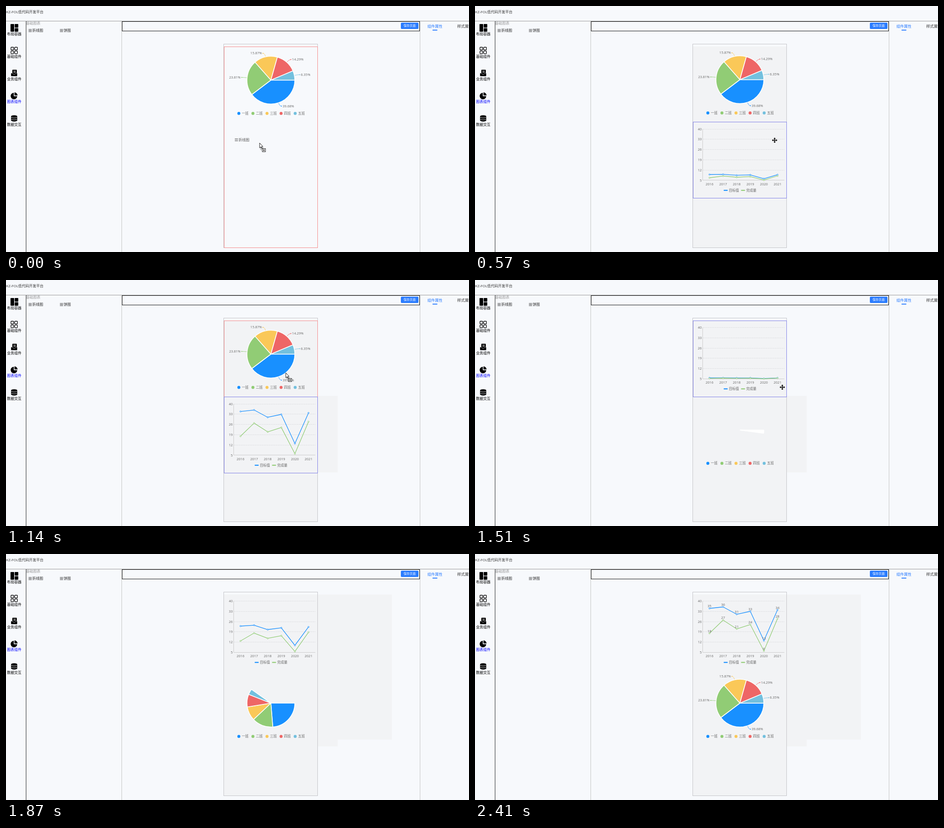
Recreate the animation shown at these times as an HTML page. Size 1026 by 546 pixels, loop 2.51 s.

```html
<!DOCTYPE html>
<html lang="zh-CN">
<head>
<meta charset="utf-8">
<title>低代码开发平台</title>
<style>
html, body { margin: 0; width: 100%; height: 100%; overflow: hidden; background: #f7f9fc; }
svg { display: block; width: 1026px; height: 546px; font: 7.5px "Open Sans", "Noto Sans CJK SC", "Noto Sans CJK", sans-serif; }
</style>
</head>
<body>
<svg viewBox="0 0 1026 546"><g id="chrome"></g><g id="stage"></g></svg>
<script>
const LOOP = 2510, GREY = '#f2f3f5', INK = '#666';
const COLORS = ['#1890ff', '#91cc75', '#fac858', '#ee6666', '#73c0de'];
const CLASSES = ['一班', '二班', '三班', '四班', '五班'];
const COUNTS = [25, 15, 10, 9, 4], TOTAL = 63;
const SERIES = [[35, 36, 31, 33, 13, 34], [18, 27, 21, 24, 6, 28]];

// time, pointer kind, pointer position
const STEPS = [
  [0, 'copy', 562, 304], [140, 'copy', 590, 303], [270, 'move', 617, 302],
  [420, 'move', 621, 300], [570, 'move', 664, 298], [720, 'arrow', 716, 311],
  [840, 'arrow', 729, 338], [990, 'move', 660, 325], [1140, 'copy', 620, 206],
  [1260, 'copy', 622, 200], [1390, 'move', 650, 220], [1510, 'move', 681, 238],
  [1630, 'arrow', 846, 330], [1750], [1870], [2020], [2140], [2260], [2410]
];
const DROP = 270, LIFT = 1140, SWAP = 1390;

const text = (x, y, s, size = 7.5, fill = INK, anchor = 'start', more = '') =>
  `<text x="${x}" y="${y + size * .36}" font-size="${size}" fill="${fill}" text-anchor="${anchor}" ${more}>${s}</text>`;
const rect = (x, y, w, h, fill, more = '') =>
  `<rect x="${x}" y="${y}" width="${w}" height="${h}" fill="${fill}" ${more}/>`;
const frame = (x, y, w, h, stroke) => rect(x, y, w, h, 'none', `stroke="${stroke}"`);
const path = (d, stroke, width = 1, fill = 'none', more = '') =>
  `<path d="${d}" stroke="${stroke}" stroke-width="${width}" fill="${fill}" ${more}/>`;
const dot = (x, y, r, fill, more = '') => `<circle cx="${x}" cy="${y}" r="${r}" fill="${fill}" ${more}/>`;
const menuItem = (x, y, s, fill) =>
  path(`M${x} ${y - 2.5}h7m-7 2.5h7m-7 2.5h7`, fill, .9) + text(x + 8.3, y, s, 8, fill);

const ease = p => p <= 0 ? 0 : p >= 1 ? 1 : p < .5 ? 4 * p ** 3 : 1 - 4 * (1 - p) ** 3;

function chrome() {
  const icons =
    rect(10, 40, 8, 17, '#000', 'rx="1"') + rect(19.2, 40, 8, 8, '#000', 'rx="1"') + rect(19.2, 49.2, 8, 7.8, '#000', 'rx="1"') +
    [[11, 91.5], [19.3, 91.5], [11, 99.8], [19.3, 99.8]].map(([x, y]) =>
      rect(x, y, 6, 6, 'none', 'rx="1" stroke="#000" stroke-width="1.3"')).join('') +
    rect(14, 141.5, 10, 11, '#000', 'rx="1"') + path('M16.5 144.7h5m-5 2.5h5', '#fff') +
    path('M11 149h3.5l1.5 2.5h4l1.5-2.5H25v5.5q0 1.5-1.5 1.5h-11q-1.5 0-1.5-1.5z', '#f7f9fc', .5, '#000') +
    path('M17.3 192.5v7.7h7.6a7.3 7.3 0 1 1-7.6-7.7z', 'none', 0, '#000') +
    path('M18.8 191.8a7 7 0 0 1 6.8 6.8h-6.8z', 'none', 0, '#000') +
    path('M11.2 245v8.5c0 4 13.8 4 13.8 0v-8.5c0-3.4-13.8-3.4-13.8 0z', 'none', 0, '#000') +
    path('M11 246.3c1 3 13 3 14 0m-14 4.2c1 3 13 3 14 0', '#f7f9fc', .9);
  const labels = ['布局容器', '基础组件', '业务组件', '图表组件', '数据交互'].map((s, i) =>
    text(2.2, 62 + 50.2 * i, s, 8, i == 3 ? '#00f' : '#000', 'start', i == 3 ? 'font-weight="500"' : '')).join('');
  return text(.5, 13.5, 'KZ-FOL低代码开发平台', 8, '#333', 'start', 'font-weight="500"') +
    path('M0 33.5H1026', '#999') + path('M256.5 34V546M917.5 34V546', '#c4c4c4') + path('M44.5 34V546', '#222') +
    frame(257.5, 34.5, 659, 21, '#111') +
    rect(875, 37, 39, 14, '#2a7cff', 'rx="2"') + text(894.5, 44, '保存页面', 6.8, '#fff', 'middle') +
    text(44.3, 38.5, '基础图表', 8, '#999') + menuItem(50, 54.5, '折线图', '#222') + menuItem(119.5, 54.5, '饼图', '#222') +
    text(933.7, 45, '组件属性', 8.4, '#2a7cff') + rect(945, 52.5, 11, 2, '#2a7cff', 'rx="1"') +
    text(1000, 45, '样式属性', 8.4, '#333') + icons + labels;
}

function pie(top, p) {
  const cx = 587, cy = top + 73.5, r = 53, e = ease(p);
  const at = (a, d) => [cx + d * Math.cos(a), cy + d * Math.sin(a)];
  let a = 0, slices = '', labels = '', legend = '';
  COUNTS.forEach((n, i) => {
    const sweep = 2 * Math.PI * n / TOTAL * e, mid = a + sweep / 2, color = COLORS[i];
    if (e > .005)
      slices += path(`M${cx} ${cy}L${at(a, r)}A${r} ${r} 0 0 1 ${at(a + sweep, r)}z`, '#fff', 1.6,
        e < .03 ? '#fff' : color, 'stroke-linejoin="bevel"');
    if (p >= 1) {
      const [x, y] = at(mid, 61), side = x > cx ? 1 : -1;
      labels += path(`M${at(mid, r)}Q${x} ${y} ${x + 4 * side} ${y}`, color, .8) + dot(x + 4 * side, y, 1, color) +
        text(x + 6.5 * side, y - .4, (100 * n / TOTAL).toFixed(2) + '%', 7.5, INK, side > 0 ? 'start' : 'end');
    }
    legend += dot(516 + 31.2 * i, top + 147.4, 3.3, color) + text(522.5 + 31.2 * i, top + 147.2, CLASSES[i]);
    a += sweep;
  });
  return labels + slices + legend;
}

function lines(top, p) {
  const left = 504.5, right = 685.5, low = top + 128.3, high = 113.8, e = ease(p);
  const px = i => left + 15.1 + 30.15 * i, py = v => low - (v - 5) / 35 * high * e;
  let out = '';
  for (let i = 0; i < 6; i++) {
    const y = low - high * i / 5, snap = Math.floor(y) + .5;
    out += path(`M${left} ${snap}H${right}`, i ? '#dcdde0' : '#ccc', 1, 'none', i ? 'stroke-dasharray="2.6 1.3"' : '') +
      text(502.3, y, 5 + 7 * i, 7.5, INK, 'end') + text(px(i), top + 136.4, 2016 + i, 7.5, INK, 'middle');
  }
  out += path(`M${left} ${low - high}V${low}`, '#ccc');
  SERIES.forEach((data, s) => {
    const color = COLORS[s];
    out += path('M' + data.map((v, i) => [px(i), py(v)]).join('L'), color, 1.3, 'none', 'stroke-linejoin="bevel"') +
      data.map((v, i) => dot(px(i), py(v), 1.4, '#fff', `stroke="${color}" stroke-width="1"`)).join('');
    if (p >= 1) out += data.map((v, i) => text(px(i), py(v) - 5, v, 7.5, INK, 'middle')).join('');
    out += rect(551 + 38.5 * s, top + 149.6, 9, 2.2, color, 'rx="1"') +
      text(562.4 + 38.5 * s, top + 150.6, ['目标值', '完成量'][s]);
  });
  return out;
}

function pointer(kind, x, y) {
  if (!kind) return '';
  const arrow = 'M0 0v11l2.5-2.3 1.7 3.6 1.6-.7-1.7-3.6h3.3z';
  let shape = '';
  if (kind == 'move') {
    const quarter = 'M0-6l2.5 2.8h-1.7v2.4h2.4v-1.7L6 0 3.2 2.5v-1.7h-2.4v2.4h1.7L0 6';
    const d = quarter + 'l-2.5-2.8h1.7v-2.4h-2.4v1.7L-6 0l2.8-2.5v1.7h2.4v-2.4h-1.7z';
    shape = path(d, '#fff', 1, '#000', 'paint-order="stroke"');
  } else if (kind == 'arrow') {
    shape = path(arrow, '#fff', .8, '#000', 'paint-order="stroke"');
  } else {
    shape = path(arrow, '#000', .9, '#fff') +
      rect(2, 10.5, 6, 4.5, 'none', 'stroke="#333" stroke-width=".8" stroke-dasharray="1 .7"') +
      rect(6, 12.5, 7, 7, '#fff', 'stroke="#000" stroke-width=".9"') + path('M9.5 14v4m-2-2h4', '#000');
  }
  return `<g transform="translate(${x} ${y})">${shape}</g>`;
}

function stage([t, kind, x, y]) {
  const red = '#f58a8a', blue = '#7f7fe6', swapped = t >= SWAP;
  const dragging = t >= LIFT && kind == 'copy', hover = kind == 'move' || dragging;
  const grow = (t - (swapped ? 1335 : 250)) / 1000;
  let out = '';

  if (t >= DROP) out += rect(483, 90, 208, 446, GREY);
  if (t >= 720) out += rect(691, 257, t >= 990 ? 44 : 31, 170, GREY);
  if (t == 840) out += rect(722, 311, 13, 76, GREY);
  if (t >= 1630) out += rect(691, 90, 164, 322, GREY);
  out += frame(482.5, 84.5, 208, 452, '#c4c4c8');

  if (t < DROP) {
    return out + frame(483.5, 90.5, 207, 446, red) + pie(91, 1) +
      menuItem(x - 55, y - 7, '折线图', '#555') + pointer(kind, x, y);
  }
  // a bordered block is two pixels taller and shifts its content by one
  const box = (top, color) => color ? frame(483.5, Math.floor(top) + .5, 207, 169, color) : '';
  const firstColor = swapped ? hover && blue : dragging && red;
  const next = 257.5 + (firstColor ? 2 : 0);
  const secondColor = !swapped && hover && blue;
  const first = 90 + (firstColor ? 1 : 0), second = next + (secondColor ? 1 : 0);
  return out + box(90, firstColor) + box(next, secondColor) +
    (swapped ? lines(first, grow) + pie(second, grow) : pie(first, 1) + lines(second, grow)) +
    pointer(kind, x, y);
}

document.getElementById('chrome').innerHTML = chrome();
const layer = document.getElementById('stage'), start = performance.now();
let shown;
function tick() {
  const t = (performance.now() - start) % LOOP;
  const step = STEPS.findLast(s => s[0] <= t);
  if (step != shown) layer.innerHTML = stage(shown = step);
  requestAnimationFrame(tick);
}
tick();
</script>
</body>
</html>
```
